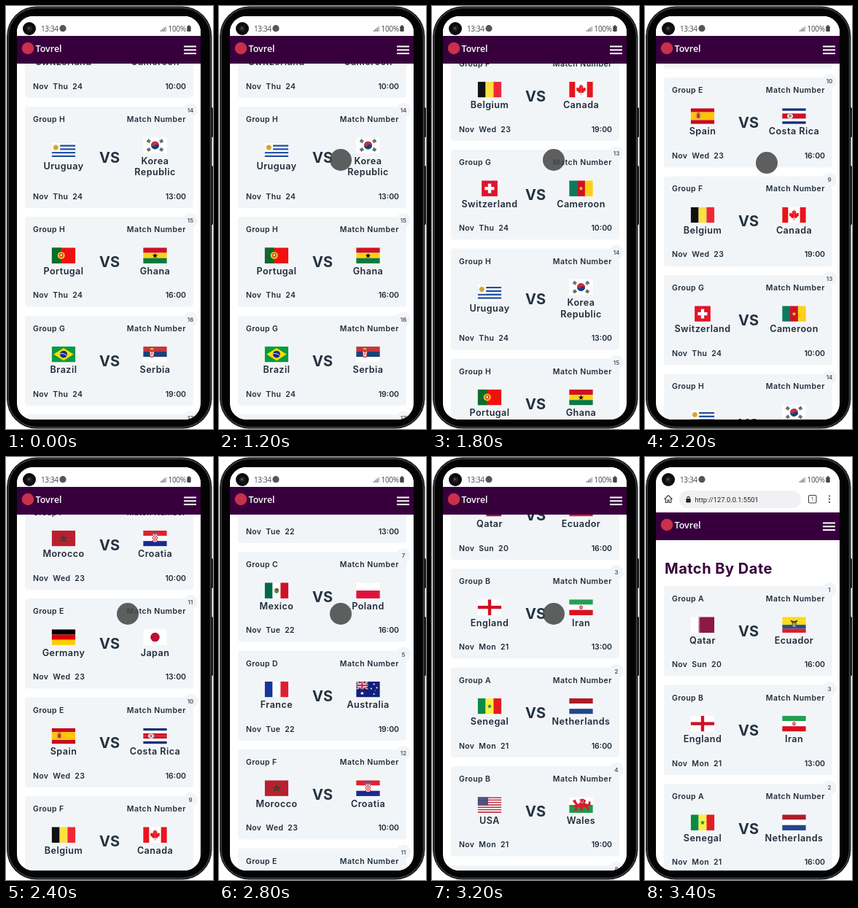
Recreate the animation shown at these times as an HTML page with a canvas. Size 284 px wide and 580 px high, loop 4900 ms.

```html
<!DOCTYPE html>
<html lang="en">
<head>
<meta charset="utf-8">
<title>Match By Date</title>
<style>
  html, body { margin: 0; width: 100%; height: 100%; overflow: hidden; background: #fff; }
  canvas { display: block; width: 284px; height: 580px; }
</style>
</head>
<body>
<canvas id="stage"></canvas>
<script>
const W = 284, H = 580, LOOP = 4900;
const canvas = document.getElementById('stage');
const ctx = canvas.getContext('2d');
const dpr = window.devicePixelRatio || 1;
canvas.width = W * dpr;
canvas.height = H * dpr;

const PURPLE = '#37003c', CARD = '#f2f5f8', INK = '#1f2b38';
const BAR = 35, PITCH = 135.5, EXTRA = 15.5, FIRST = 177;

// number | group | home | away | date | time ("/" breaks a name)
const matches = `1|A|Qatar|Ecuador|Sun 20|16:00
3|B|England|Iran|Mon 21|13:00
2|A|Senegal|Netherlands|Mon 21|16:00
4|B|USA|Wales|Mon 21|19:00
8|C|Argentina|Saudi Arabia|Tue 22|10:00
6|D|Denmark|Tunisia|Tue 22|13:00
7|C|Mexico|Poland|Tue 22|16:00
5|D|France|Australia|Tue 22|19:00
12|F|Morocco|Croatia|Wed 23|10:00
11|E|Germany|Japan|Wed 23|13:00
10|E|Spain|Costa Rica|Wed 23|16:00
9|F|Belgium|Canada|Wed 23|19:00
13|G|Switzerland|Cameroon|Thu 24|10:00
14|H|Uruguay|Korea/Republic|Thu 24|13:00
15|H|Portugal|Ghana|Thu 24|16:00
16|G|Brazil|Serbia|Thu 24|19:00
17|B|Wales|Iran|Fri 25|10:00`.split('\n').map(row => row.split('|'));

// ---- drawing helpers ----
function rect(x, y, w, h, c) { ctx.fillStyle = c; ctx.fillRect(x, y, w, h); }
function disc(x, y, r, c) {
  ctx.fillStyle = c;
  ctx.beginPath(); ctx.arc(x, y, r, 0, 7); ctx.fill();
}
function oval(x, y, rx, ry, c) {
  ctx.fillStyle = c;
  ctx.beginPath(); ctx.ellipse(x, y, rx, ry, 0, 0, 7); ctx.fill();
}
function round(x, y, w, h, r, c) {
  ctx.fillStyle = c;
  ctx.beginPath(); ctx.roundRect(x, y, w, h, r); ctx.fill();
}
function poly(c, ...p) {
  ctx.fillStyle = c;
  ctx.beginPath();
  for (let i = 0; i < p.length; i += 2) ctx.lineTo(p[i], p[i + 1]);
  ctx.closePath(); ctx.fill();
}
function line(c, w, ...p) {
  ctx.strokeStyle = c; ctx.lineWidth = w;
  ctx.beginPath();
  for (let i = 0; i < p.length; i += 2) ctx.lineTo(p[i], p[i + 1]);
  ctx.stroke();
}
function star(x, y, r, c, n = 5, inner = 0.4) {
  const p = [];
  for (let i = 0; i < n * 2; i++) {
    const a = Math.PI * i / n, d = i % 2 ? r * inner : r;
    p.push(x + d * Math.sin(a), y - d * Math.cos(a));
  }
  poly(c, ...p);
}
function text(s, x, y, font, c = INK, align = 'left', gap = 0) {
  ctx.font = font; ctx.fillStyle = c; ctx.textAlign = align;
  ctx.letterSpacing = gap + 'px';
  ctx.fillText(s, x, y);
}

// ---- flags, drawn in a 30 x 20 box ----
const rows = (...cs) => cs.forEach((c, i) => rect(0, i * 20 / cs.length, 30, 20 / cs.length, c));
const cols = (...cs) => cs.forEach((c, i) => rect(i * 30 / cs.length, 0, 30 / cs.length, 20, c));
const fill = c => rect(0, 0, 30, 20, c);

function unionJack() {
  ctx.save();
  ctx.beginPath(); ctx.rect(0, 0, 15, 10); ctx.clip();
  for (const [c, w] of [['#fff', 2], ['#d3122c', 0.8]]) {
    line(c, w, 0, 0, 15, 10);
    line(c, w, 0, 10, 15, 0);
  }
  rect(5.8, 0, 3.4, 10, '#fff'); rect(0, 3.3, 15, 3.4, '#fff');
  rect(6.6, 0, 1.8, 10, '#d3122c'); rect(0, 4.1, 15, 1.8, '#d3122c');
  ctx.restore();
}

function trigram(x, y, a) {
  ctx.save();
  ctx.translate(x, y); ctx.rotate(a);
  for (let i = -1; i < 2; i++) rect(-2, i * 1.4 - 0.45, 4, 0.9, '#222');
  ctx.restore();
}

const flags = {
  Qatar() {
    fill('#fff');
    const p = [30, 0, 9, 0];
    for (let i = 0; i < 9; i++) p.push(12, (i + 0.5) * 20 / 9, 9, (i + 1) * 20 / 9);
    poly('#8a1a43', ...p, 30, 20);
  },
  Ecuador() {
    rows('#fbdc12', '#fbdc12', '#1d4d9c', '#dc1c2c');
    oval(15, 9.5, 3, 4, '#6d6a3c'); oval(15, 10, 1.7, 2.6, '#7fb0c8');
    poly('#3d3a30', 10, 4, 15, 5.5, 20, 4, 18, 7, 12, 7);
  },
  England() { fill('#fff'); rect(13, 0, 4, 20, '#ce1126'); rect(0, 8, 30, 4, '#ce1126'); },
  Iran() {
    rows('#239f50', '#fff', '#da1020');
    oval(15, 10, 2.3, 2.4, '#da3040'); oval(15, 9.8, 1.2, 1.7, '#fff');
    rect(14.6, 7.8, 0.8, 4.5, '#da1020');
  },
  Senegal() { cols('#0b8a45', '#fdef42', '#e31b23'); star(15, 10.3, 3.3, '#0b8a45'); },
  Netherlands() { rows('#ae1c28', '#fff', '#21468b'); },
  USA() {
    for (let i = 0; i < 13; i++) rect(0, i * 20 / 13, 30, 20 / 13, i % 2 ? '#fff' : '#bd2a40');
    rect(0, 0, 13, 140 / 13, '#3c3b6e');
    for (let j = 0; j < 5; j++)
      for (let i = 0; i < 6 - j % 2; i++) disc(1.5 + i * 2 + j % 2, 1.5 + j * 1.95, 0.45, '#fff');
  },
  Wales() {
    rows('#fff', '#1a9c45');
    poly('#d02030', 4, 5, 8, 3, 9, 6, 11, 9, 14, 7, 13, 3, 17, 2, 21, 4, 20, 8, 24, 9, 25, 5, 27, 6, 27, 11,
      23, 12, 26, 16, 24, 17, 20, 13, 17, 13, 18, 17, 14, 17, 14, 13, 10, 13, 10, 17, 6, 17, 8, 13, 4, 12, 8, 10, 6, 7);
    line('#fff', 0.5, 14, 3.5, 16, 8); line('#fff', 0.5, 18, 4, 17, 8);
  },
  Argentina() { rows('#74acdf', '#fff', '#74acdf'); star(15, 10, 2.6, '#f6b40e', 12, 0.6); },
  'Saudi Arabia'() { fill('#0d6b3b'); rect(8, 6, 14, 4, '#cfe2d6'); rect(8, 13, 14, 1, '#fff'); },
  Denmark() { fill('#c8102e'); rect(9, 0, 3.2, 20, '#fff'); rect(0, 8.4, 30, 3.2, '#fff'); },
  Tunisia() {
    fill('#e70013'); disc(15, 10, 5, '#fff'); disc(15, 10, 3.7, '#e70013');
    disc(16, 10, 3, '#fff'); star(16, 10, 2, '#e70013');
  },
  Mexico() {
    cols('#006847', '#fff', '#ce1126');
    oval(15, 10, 2.8, 3, '#8b7a4c'); oval(15.6, 9, 1.4, 1.6, '#5c4a2a');
    line('#4f8a4e', 0.9, 12.3, 11.5, 15, 13.4, 17.7, 11.5);
  },
  Poland() { rows('#fff', '#dc143c'); },
  France() { cols('#16359a', '#fff', '#dc2036'); },
  Australia() {
    fill('#12207a'); unionJack();
    star(7.5, 15, 2.6, '#fff', 7);
    for (const [x, y] of [[22.5, 3.5], [19, 9], [26, 8], [22.5, 16]]) star(x, y, 1.5, '#fff', 7);
    star(24, 11.5, 0.8, '#fff');
  },
  Morocco() {
    fill('#b9202f');
    const p = [];
    for (let i = 0; i <= 5; i++) {
      const a = i * Math.PI * 0.8;
      p.push(15 + 4.3 * Math.sin(a), 10.3 - 4.3 * Math.cos(a));
    }
    line('#1f4a32', 1, ...p);
  },
  Croatia() {
    rows('#e0222c', '#fff', '#1b2a8c');
    round(11.5, 4.5, 7, 10, [0, 0, 3, 3], '#fff');
    for (let j = 0; j < 5; j++)
      for (let i = 0; i < 5; i++)
        if ((i + j) % 2 === 0) rect(11.5 + i * 1.4, 5 + j * 1.8, 1.4, 1.8, '#e0222c');
    poly('#3d6db5', 11, 4.8, 12, 2.2, 15, 3, 18, 2.2, 19, 4.8);
  },
  Germany() { rows('#000', '#dd0000', '#ffce00'); },
  Japan() { fill('#fff'); disc(15, 10, 5.8, '#bc1030'); },
  Spain() {
    rows('#c60b1e', '#ffc400', '#ffc400', '#c60b1e');
    rect(6.2, 7, 1, 6, '#b9a58a'); rect(12, 7, 1, 6, '#b9a58a');
    round(7.6, 7.5, 4, 5.5, [0, 0, 2, 2], '#b8353a'); rect(8, 5.5, 3.2, 1.6, '#c4472c');
  },
  'Costa Rica'() {
    rows('#12307a', '#fff', '#ce1126', '#ce1126', '#fff', '#12307a');
    oval(10, 10, 3.6, 2.9, '#fff'); oval(10, 10, 2, 2, '#6f9a8c');
  },
  Belgium() { cols('#111', '#fae042', '#ed2939'); },
  Canada() {
    fill('#fff'); rect(0, 0, 7.5, 20, '#e8141c'); rect(22.5, 0, 7.5, 20, '#e8141c');
    const half = [0, -7, 1.5, -4.5, 2.6, -5, 2.2, -1.2, 4, -3, 4.4, -2, 6.2, -2.3, 5.5, 0, 6.3, 0.7, 3, 3.2, 3.3, 4.2, 0.4, 3.8, 0.4, 7];
    for (const s of [-1, 1]) poly('#e8141c', ...half.map((v, i) => i % 2 ? v + 10 : 15 + s * v), 15, 17);
  },
  Switzerland() {
    rect(5, 0, 20, 20, '#e0142c');
    rect(13, 4, 4, 12, '#fff'); rect(9, 8, 12, 4, '#fff');
  },
  Cameroon() { cols('#0b7a5e', '#ce1126', '#fcd116'); star(15, 10.2, 3, '#fcd116'); },
  Uruguay() {
    for (let i = 0; i < 9; i++) rect(0, i * 20 / 9, 30, 20 / 9, i % 2 ? '#1e4fa0' : '#fff');
    rect(0, 0, 10.5, 100 / 9, '#fff');
    star(5.2, 5.5, 4.3, '#d9a520', 12, 0.6); disc(5.2, 5.5, 2.2, '#c9a24a');
  },
  'Korea/Republic'() {
    fill('#fff');
    ctx.save();
    ctx.translate(15, 10); ctx.rotate(0.59);
    disc(0, 0, 5, '#0d4080');
    ctx.fillStyle = '#cd2e3a';
    ctx.beginPath(); ctx.arc(0, 0, 5, Math.PI, 0); ctx.fill();
    disc(-2.5, 0, 2.5, '#cd2e3a'); disc(2.5, 0, 2.5, '#0d4080');
    ctx.restore();
    trigram(7, 4.6, -0.98); trigram(23, 15.4, -0.98);
    trigram(23, 4.6, 0.98); trigram(7, 15.4, 0.98);
  },
  Portugal() {
    fill('#f01010'); rect(0, 0, 12, 20, '#0b6b2e');
    disc(12, 10, 4.6, '#f5d21c'); disc(12, 10, 3.4, '#c9a31a');
    round(10, 7.4, 4, 5, [0, 0, 2, 2], '#e01818'); round(10.9, 8.2, 2.2, 3, [0, 0, 1, 1], '#fff');
  },
  Ghana() { rows('#ce1126', '#fcd116', '#0b7a3c'); star(15, 10.3, 3.6, '#000'); },
  Brazil() {
    fill('#0a9a40');
    poly('#fedd08', 15, 2, 27.5, 10, 15, 18, 2.5, 10);
    disc(15, 10, 4.6, '#12307a'); line('#fff', 0.8, 10.6, 9.2, 14, 9, 17, 10, 19, 11.8);
  },
  Serbia() {
    rows('#c6363c', '#1c4077', '#fff');
    round(8, 4, 6, 10, [0, 0, 3, 3], '#c6363c');
    poly('#fff', 8.6, 6, 11, 8, 13.4, 6, 12.6, 12, 11, 13, 9.4, 12);
    rect(10.2, 8.2, 1.6, 2.6, '#c6363c'); rect(9, 2, 4, 2.2, '#e0b040');
  }
};

function flag(name, cx, y) {
  ctx.save();
  ctx.translate(cx - 16.3, y);
  ctx.scale(32.6 / 30, 21.6 / 20);
  ctx.beginPath(); ctx.rect(0, 0, 30, 20); ctx.clip();
  flags[name]();
  ctx.restore();
}

// ---- page ----
const LABEL = '600 10.5px Inter, sans-serif';
const NAME = '600 12.6px Inter, sans-serif';

function team(name, cx, y, tall) {
  const parts = name.split('/');
  const dy = tall && parts.length === 1 ? EXTRA / 2 : 0;
  flag(name, cx, y + 42.3 + dy);
  parts.forEach((s, i) => text(s, cx, y + 78.5 + dy + i * EXTRA, NAME, INK, 'center', 0.45));
}

function card([num, group, home, away, date, time], y, tall) {
  const add = tall ? EXTRA : 0;
  round(26, y, 231, 123.5 + add, 4, CARD);
  disc(253, y + 5, 10, CARD);
  text(num, 253, y + 8, '600 8px Inter, sans-serif', '#4a5360', 'center');
  text('Group ' + group, 37, y + 21, LABEL, INK, 'left', 0.35);
  text('Match Number', 247, y + 21, LABEL, INK, 'right', 0.5);
  team(home, 79, y, tall);
  team(away, 204.5, y, tall);
  text('VS', 142, y + 69 + add / 2, '700 20px Inter, sans-serif', '#233240', 'center');
  text('Nov  ' + date.replace(' ', '  '), 37, y + 111 + add, LABEL, INK, 'left', 0.35);
  text(time, 247, y + 111 + add, LABEL, INK, 'right');
}

function page(scroll) {
  text('Match By Date', 27, 160 - scroll, '700 20px Inter, sans-serif', PURPLE, 'left', 0.5);
  let y = FIRST - scroll;
  for (const m of matches) {
    const tall = m[3].includes('/');
    if (y > -160 && y < H) card(m, y, tall);
    y += PITCH + (tall ? EXTRA : 0);
  }
}

function header(dy) {
  rect(14, 41 + dy, 254, 38, PURPLE);
  disc(30, 58 + dy, 8.3, '#c9304a');
  text('Tovrel', 40.5, 62.5 + dy, '600 12.5px "Open Sans", sans-serif', '#fff');
  for (let i = 0; i < 3; i++) rect(244, 54.5 + i * 4.8 + dy, 17, 2, '#fff');
}

function addressBar(dy) {
  const c = '#3c4043';
  rect(14, 41, 254, BAR, '#fff');
  ctx.save();
  ctx.translate(0, dy - BAR);
  line(c, 1.2, 26.5, 58, 32, 52.5, 37.5, 58);
  line(c, 1.2, 28.3, 57, 28.3, 62.5, 31, 62.5, 31, 59, 33, 59, 33, 62.5, 35.7, 62.5, 35.7, 57);
  round(47, 46, 167, 24, 12, '#f0f1f2');
  round(56.3, 57, 6.4, 5.4, 1, '#222');
  ctx.strokeStyle = '#222'; ctx.lineWidth = 1.1;
  ctx.beginPath(); ctx.arc(59.5, 56.5, 1.9, Math.PI, 0); ctx.stroke();
  text('http://127.0.0.1:5501', 68.5, 61.5, '9.3px Roboto, sans-serif', '#222');
  ctx.strokeStyle = c; ctx.lineWidth = 1.1;
  ctx.beginPath(); ctx.roundRect(224.5, 52.5, 10.5, 10.5, 1.5); ctx.stroke();
  text('1', 229.7, 60.4, '7px Roboto, sans-serif', c, 'center');
  for (let i = 0; i < 3; i++) disc(253, 53.5 + i * 4.2, 1.1, c);
  ctx.restore();
}

function statusBar() {
  const c = '#444';
  rect(14, 14, 254, 27, '#fff');
  disc(32, 31, 9, '#0b0b0d'); disc(32, 31, 4, '#1d1e26'); disc(31.5, 30.5, 1.5, '#4a4f63');
  text('13:34', 48, 34.8, '10px "Open Sans", sans-serif', c, 'left', -0.4);
  disc(78, 30.7, 4.6, '#555');
  for (let i = 0; i < 4; i++) rect(212 + i * 2.2, 33 - i * 1.7, 1.4, 2 + i * 1.7, i < 3 ? '#777' : '#aaa');
  text('100%', 222.5, 34.8, '10px "Open Sans", sans-serif', c, 'left', -0.3);
  round(248.3, 27.5, 5.4, 7.5, 1, c); rect(249.8, 26.3, 2.4, 1.5, c);
}

function phone() {
  round(280, 139, 4, 41, 1.5, '#222');
  round(280, 219, 4, 81, 1.5, '#222');
  round(1, 0.5, 281.5, 579, 41, '#17181a');
  ctx.strokeStyle = '#4b4c50'; ctx.lineWidth = 1;
  ctx.beginPath(); ctx.roundRect(3, 2.5, 277.5, 575, 39); ctx.stroke();
  round(4, 3.5, 275.5, 573, 38, '#030303');
}

// ---- motion ----
const path = [[1500, 1800.5], [1800, 1606], [1900, 1572], [2000, 1572], [2400, 1202.5],
  [2650, 965], [2800, 860], [3200, 159.5], [3300, 40], [3400, 0]];
const slope = i => (path[i + 1][1] - path[i][1]) / (path[i + 1][0] - path[i][0]);

// Tangent that keeps the scroll from overshooting
function tangent(i) {
  if (i === 0 || i === path.length - 1) return 0;
  const a = slope(i - 1), b = slope(i);
  return a * b > 0 ? 2 * a * b / (a + b) : 0;
}

function scrollAt(t) {
  if (t <= path[0][0]) return path[0][1];
  const i = path.findIndex(p => t < p[0]) - 1;
  if (i < 0) return 0;
  const [t0, y0] = path[i], [t1, y1] = path[i + 1];
  const d = t1 - t0, u = (t - t0) / d, v = 1 - u;
  return y0 * v * v * (1 + 2 * u) + y1 * u * u * (1 + 2 * v)
    + d * (tangent(i) * u * v * v - tangent(i + 1) * u * u * v);
}

function draw(t) {
  const scroll = scrollAt(t);
  const bar = Math.max(0, BAR - scroll);
  ctx.setTransform(dpr, 0, 0, dpr, 0, 0);
  rect(0, 0, W, H, '#fff');
  phone();
  ctx.save();
  ctx.beginPath(); ctx.roundRect(15, 14, 252, 553, 22); ctx.clip();
  rect(14, 14, 254, 554, '#fff');
  page(scroll);
  if (bar > 0) addressBar(bar);
  header(bar);
  statusBar();
  if (t >= 1200 && t < 3400) disc(167, t < 2100 ? 211 : 215, 15, 'rgba(72,72,72,.87)');
  ctx.restore();
}

function tick() {
  draw(Math.floor(performance.now() % LOOP / 100) * 100);
  requestAnimationFrame(tick);
}
tick();
</script>
</body>
</html>
```
